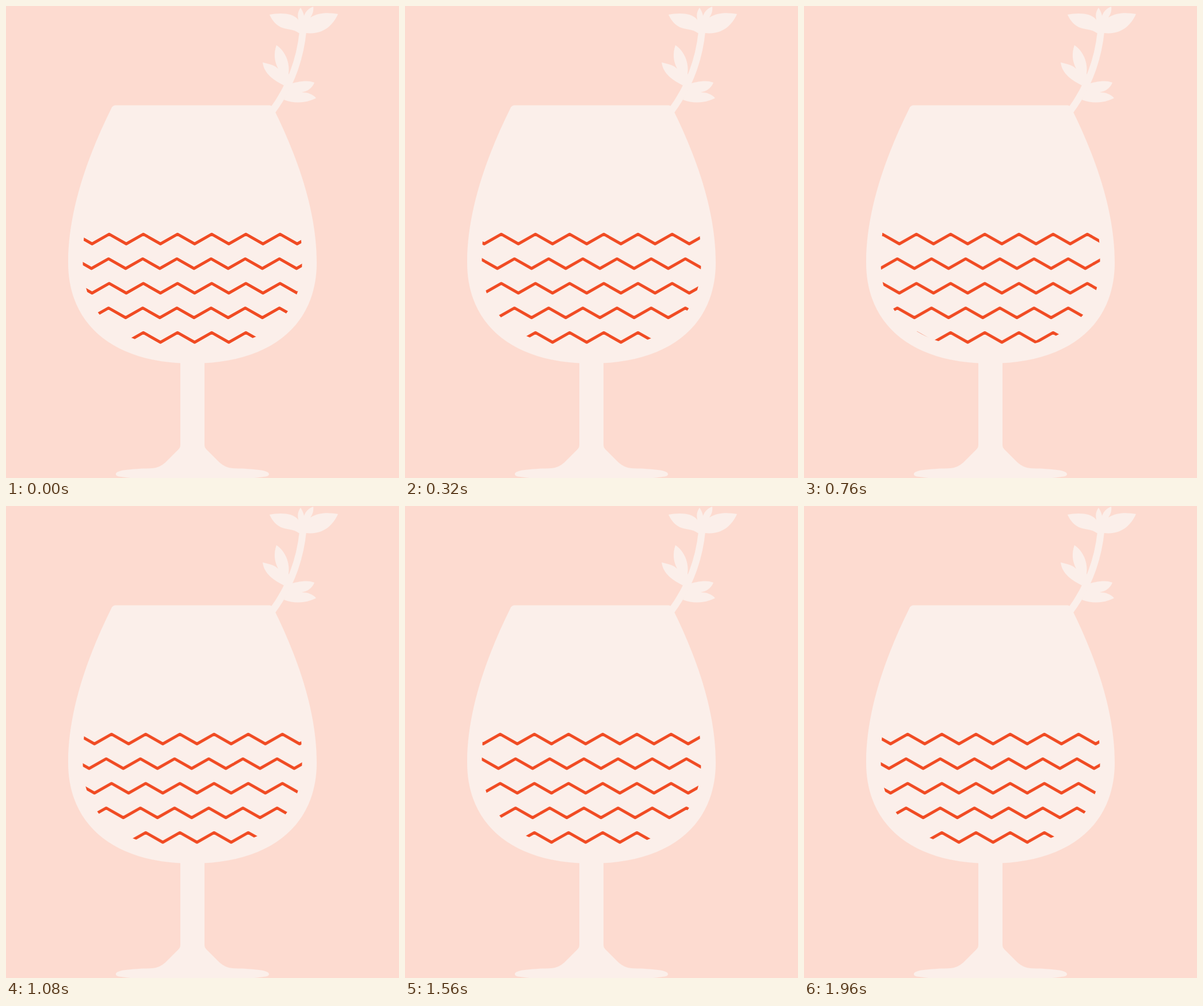
An HTML page for the animation above (2 s loop, 683 by 820 pixels).

```html
<!DOCTYPE html>
<html lang="en">
<head>
<meta charset="utf-8">
<title>Glass with waves</title>
<style>
  html, body { margin: 0; width: 100%; height: 100%; overflow: hidden; background: #fddbd0; }
  svg { display: block; width: 683px; height: 820px; }
  .glass { fill: #fbefea; }
  .stalk { fill: none; stroke: #fbefea; stroke-width: 12; }
  .wave {
    fill: none; stroke: #f04b23; stroke-width: 5; stroke-linejoin: round;
    animation: drift 2s steps(50, end) infinite;
  }
  .wave:nth-child(even) { animation-name: drift-back; }
  @keyframes drift { to { transform: translateX(667.55px); } }
  @keyframes drift-back { to { transform: translateX(-667.55px); } }
</style>
</head>
<body>
<svg viewBox="0 0 683 820">
  <defs>
    <clipPath id="drink">
      <path d="M136.7 390C134.5 409 133.5 426 133.5 446C133.5 544 206 595 324 595
               S514.5 544 514.5 446C514.5 426 513.5 409 511.3 390Z"/>
    </clipPath>
  </defs>

  <g class="glass">
    <!-- bowl -->
    <path d="M191 172.5H457Q463 172.5 465 178C502 253 540 350 540 446
             C540 551 464 621 324 621S108 551 108 446C108 350 146 253 183 178Q185 172.5 191 172.5Z"/>
    <!-- stem and foot -->
    <path d="M303 615H345V763Q345 767 348 770L371 793Q381 802 393 803
             C420 804 457 805 457 813Q458 817 447 818Q435 820 420 821H228
             Q213 820 201 818Q190 817 191 813C191 805 228 804 255 803
             Q267 802 277 793L300 770Q303 767 303 763Z"/>
    <!-- sprig -->
    <path class="stalk" d="M463 182C493 141 511 95 516 44"/>
    <path d="M458 15C474 12 498 11 508 24C506 15 508 8 512 3C515 8 517 12 518 17
             C521 9 526 4 534 1C535 9 533 14 529 20C543 11 560 11 577 14
             C567 36 549 50 522 47L509 47C498 39 490 42 478 37C468 32 462 24 458 15Z"/>
    <path d="M470 68C485 78 494 98 491 118L497 125L483 138C466 129 449 119 446 98
             C457 101 466 102 473 109C466 96 465 82 470 68Z"/>
    <path d="M495 135C509 131 524 128 536 133C532 143 524 148 514 150
             C524 150 533 153 539 160C521 169 502 170 483 163Z"/>
  </g>

  <g clip-path="url(#drink)"><g id="waves"></g></g>
</svg>
<script>
  const HALF = 29.7, AMP = 8.4, ROW_GAP = 42.75, PERIODS = 40;
  const waves = document.getElementById('waves');

  for (let row = 0; row < 5; row++) {
    const peak = row % 2 ? 178.2 : 179.3;
    const x = peak - 16 * 2 * HALF;
    const y = 404.8 + row * ROW_GAP - AMP;
    const zigzag = `l${HALF} ${2 * AMP} ${HALF} ${-2 * AMP}`.repeat(PERIODS);
    const path = document.createElementNS('http://www.w3.org/2000/svg', 'path');
    path.setAttribute('class', 'wave');
    path.setAttribute('d', `M${x} ${y}${zigzag}`);
    waves.append(path);
  }
</script>
</body>
</html>
```
